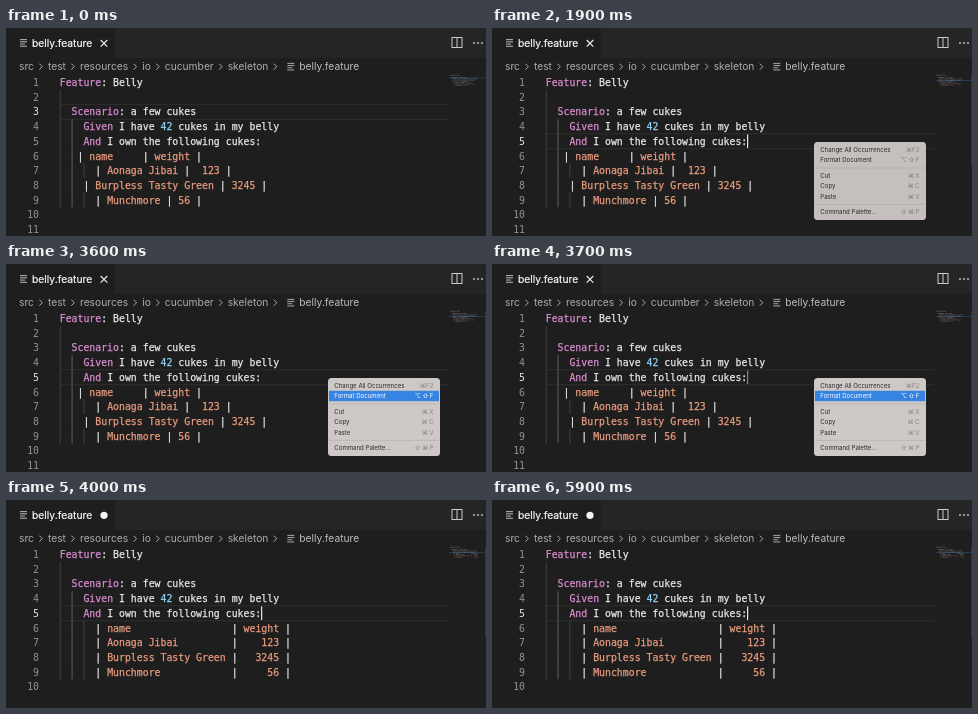
An HTML page with a canvas for the animation above (6.2 s loop, 480 px wide and 208 px high).

```html
<!DOCTYPE html>
<html lang="en">
<head>
<meta charset="utf-8">
<title>Formatting a feature file</title>
<style>
  html, body { margin: 0; width: 100%; height: 100%; overflow: hidden; background: #1e1e1e; }
  canvas { display: block; width: 480px; height: 208px; }
</style>
</head>
<body>
<canvas id="stage"></canvas>
<script>
const W = 480, H = 208, LOOP = 6200, STEP = 100;
const dpr = window.devicePixelRatio || 1;

function makeContext(canvas) {
  canvas.width = W * dpr;
  canvas.height = H * dpr;
  const context = canvas.getContext('2d');
  context.scale(dpr, dpr);
  return context;
}

const stage = makeContext(document.getElementById('stage'));
const layer = makeContext(document.createElement('canvas'));
let ctx = stage;

const SANS = 'Inter, "DejaVu Sans", sans-serif';
const CODE = '9.85px "DejaVu Sans Mono", monospace';
const LEFT = 53.7, CHAR = 5.93, TOP = 54.5, PITCH = 14.68;
const COLOR = { text: '#e8e8e8', key: '#d88cd0', num: '#8cd6fa', cell: '#e89a7e' };

// Times of the main events, in ms
const CLICK = 1800, MENU = 1900, HOVER1 = 2500, HOVER2 = 3300, CHOOSE = 3800, FORMAT = 3900;
const BLINKS = [[2200, 0], [2700, 1], [3200, 0], [3700, 1], [4400, 0], [4800, 1], [5300, 0], [5800, 1]];

const head = [
  'Feature: Belly', '', '  Scenario: a few cukes',
  '    Given I have 42 cukes in my belly',
  '    And I own the following cukes:'
];
const cells = [['name', 'weight'], ['Aonaga Jibai', '123'], ['Burpless Tasty Green', '3245'], ['Munchmore', '56']];
const messy = [...head,
  '   | name     | weight |',
  '      | Aonaga Jibai |  123 |',
  '    | Burpless Tasty Green | 3245 |',
  '      | Munchmore | 56 |', '', ''];
const tidy = [...head,
  ...cells.map(([name, weight]) => `      | ${name.padEnd(20)} | ${weight.padStart(6)} |`), ''];

const menuItems = [
  ['Change All Occurrences', '⌘F2', 121.8], ['Format Document', '⌥\u2009⇧\u2009F', 132],
  ['Cut', '⌘\u2009X', 147.8], ['Copy', '⌘\u2009C', 158.2], ['Paste', '⌘\u2009V', 168.6],
  ['Command Palette...', '⇧\u2009⌘\u2009P', 184]
];

const rowY = row => TOP + row * PITCH;
const colX = col => LEFT + col * CHAR;

function rect(x, y, w, h, color) {
  ctx.fillStyle = color;
  ctx.fillRect(x, y, w, h);
}

function text(str, x, y, color, font, align = 'left', weight = 0) {
  ctx.font = font;
  ctx.textAlign = align;
  ctx.fillStyle = ctx.strokeStyle = color;
  ctx.fillText(str, x, y);
  if (weight) {
    ctx.lineWidth = weight;
    ctx.strokeText(str, x, y);
  }
}

function strokePath(points, color, width = 1) {
  ctx.strokeStyle = color;
  ctx.lineWidth = width;
  ctx.beginPath();
  points.forEach(([x, y], i) => i ? ctx.lineTo(x, y) : ctx.moveTo(x, y));
  ctx.stroke();
}

function dot(x, y, r, color) {
  ctx.fillStyle = color;
  ctx.beginPath();
  ctx.arc(x, y, r, 0, Math.PI * 2);
  ctx.fill();
}

function fileIcon(x, y, color) {
  [7, 7, 5, 7].forEach((w, i) => rect(x, y - 3.8 + i * 2.2, w, 0.9, color));
}

function drawHeader(changed) {
  rect(0, 0, W, 30, '#252526');
  rect(0, 0, 109, 30, '#1e1e1e');
  fileIcon(14, 15, '#c8c8c8');
  text('belly.feature', 26, 18.6, '#f8f8f8', '10.3px ' + SANS, 'left', 0.2);
  if (changed) {
    dot(98, 15.3, 3.6, '#f4f4f4');
  } else {
    strokePath([[94.7, 12], [101.3, 18.6]], '#f0f0f0', 1.1);
    strokePath([[101.3, 12], [94.7, 18.6]], '#f0f0f0', 1.1);
  }
  ctx.strokeStyle = '#cccccc';
  ctx.lineWidth = 1;
  ctx.strokeRect(446, 9.5, 10, 10);
  strokePath([[451, 9.5], [451, 19.5]], '#cccccc');
  for (let i = 0; i < 3; i++) dot(468 + i * 4, 15, 0.9, '#cccccc');
}

function drawPath() {
  const font = '10.25px ' + SANS, color = '#acacac', gap = 14;
  let x = 13;
  for (const part of ['src', 'test', 'resources', 'io', 'cucumber', 'skeleton']) {
    text(part, x, 42.2, color, font);
    x += ctx.measureText(part).width + gap;
    const c = x - gap / 2;
    strokePath([[c - 1.6, 35.7], [c + 1.4, 38.7], [c - 1.6, 41.7]], color);
  }
  fileIcon(281.3, 38.7, '#b4b4b4');
  text('belly.feature', 293.3, 42.2, '#bcbcbc', font);
}

function drawCodeLine(line, row) {
  const isTable = line.includes('|');
  const y = rowY(row) + 3.6;
  const words = /\||\b(?:Feature|Scenario|Given|And)\b|\d+|[^\s|]+/g;
  for (const { 0: word, index } of line.matchAll(words)) {
    let color = COLOR.text;
    if (isTable) color = word === '|' ? COLOR.text : COLOR.cell;
    else if (/^(Feature|Scenario|Given|And)$/.test(word)) color = COLOR.key;
    else if (/^\d/.test(word)) color = COLOR.num;
    text(word, colX(index), y, color, CODE, 'left', 0.25);
  }
}

function drawEditor(lines, active) {
  const y = rowY(active);
  rect(54, y - 8, 388, 1, '#2e2e2e');
  rect(54, y + 7, 388, 1, '#2e2e2e');

  lines.forEach((line, row) => {
    const indent = row === 1 ? 2 : line.search(/\S/);
    for (let col = 0; col < Math.min(indent, 6) - 1; col += 2) {
      rect(colX(col), rowY(row) - PITCH / 2, 1, PITCH, col === 2 ? '#606060' : '#404040');
    }
    // An odd indent still shows the guide it has passed
    if (indent === 3) rect(colX(2), rowY(row) - PITCH / 2, 1, PITCH, '#606060');
    text(String(row + 1), 33, rowY(row) + 3.6, row === active ? '#e0e0e0' : '#929292', CODE, 'right');
    drawCodeLine(line, row);
  });
}

function drawMinimap(lines, active) {
  rect(443, 47 + active * 1.25, 37, 0.9, '#28405a');
  ctx.globalAlpha = 0.36;
  lines.forEach((line, row) => {
    for (const { 0: word, index } of line.matchAll(/\S+/g)) {
      const color = row > 4 ? '#c8aaa0' : '#b4bccc';
      rect(444 + index * 0.72, 46.8 + row * 1.25, word.length * 0.72, 0.75, color);
    }
  });
  ctx.globalAlpha = 1;
}

function drawCaret(t) {
  if (t < CLICK) return;
  let alpha = 1;
  for (const [time, on] of BLINKS) {
    if (t >= time) alpha = t < time + STEP ? 0.5 : on;
  }
  ctx.globalAlpha = alpha;
  rect(255, rowY(4) - 6.8, 1.2, 13.6, '#e6e6e6');
  ctx.globalAlpha = 1;
}

function drawMenuItem([label, keys, y], selected) {
  if (selected) rect(323, y - 5.2, 110, 10.4, '#3584e4');
  text(label, 328.3, y + 2.2, selected ? '#ffffff' : '#2c2a2a', '6.1px ' + SANS);
  text(keys, 427.5, y + 2.2, selected ? '#ffffff' : '#8b8583', '6.3px ' + SANS, 'right');
}

function drawMenuBox(hover) {
  ctx.clearRect(0, 0, W, H);
  ctx.beginPath();
  ctx.roundRect(322, 114, 112, 78, 3.5);
  ctx.fillStyle = '#cec8c6';
  ctx.fill();
  rect(322.5, 139.6, 111, 0.8, '#b9b3b1');
  rect(322.5, 175.9, 111, 0.8, '#b9b3b1');
  menuItems.forEach((item, i) => drawMenuItem(item, i === hover));
}

// The menu is painted on its own layer so that it fades as a whole
function drawMenu(t) {
  if (t < MENU || t >= FORMAT + STEP) return;
  ctx = layer;
  drawMenuBox(t >= HOVER2 ? 1 : t >= HOVER1 ? 0 : -1);
  ctx = stage;
  ctx.globalAlpha = t >= FORMAT ? 0.06 : t >= CHOOSE ? 0.34 : t < MENU + STEP ? 0.95 : 1;
  ctx.drawImage(layer.canvas, 0, 0, W, H);
  ctx.globalAlpha = 1;
}

function draw(t) {
  const formatted = t >= FORMAT;
  const lines = formatted ? tidy : messy;
  const active = t < CLICK ? 2 : 4;
  rect(0, 0, W, H, '#1e1e1e');
  drawHeader(formatted);
  drawPath();
  drawEditor(lines, active);
  drawMinimap(lines, active);
  if (t >= CLICK) rect(479, 47, 1, 90, '#333333');
  drawCaret(t);
  drawMenu(t);
}

const start = performance.now();
function tick() {
  const t = (performance.now() - start) % LOOP;
  draw(Math.floor(t / STEP) * STEP);
  requestAnimationFrame(tick);
}
tick();
</script>
</body>
</html>
```
